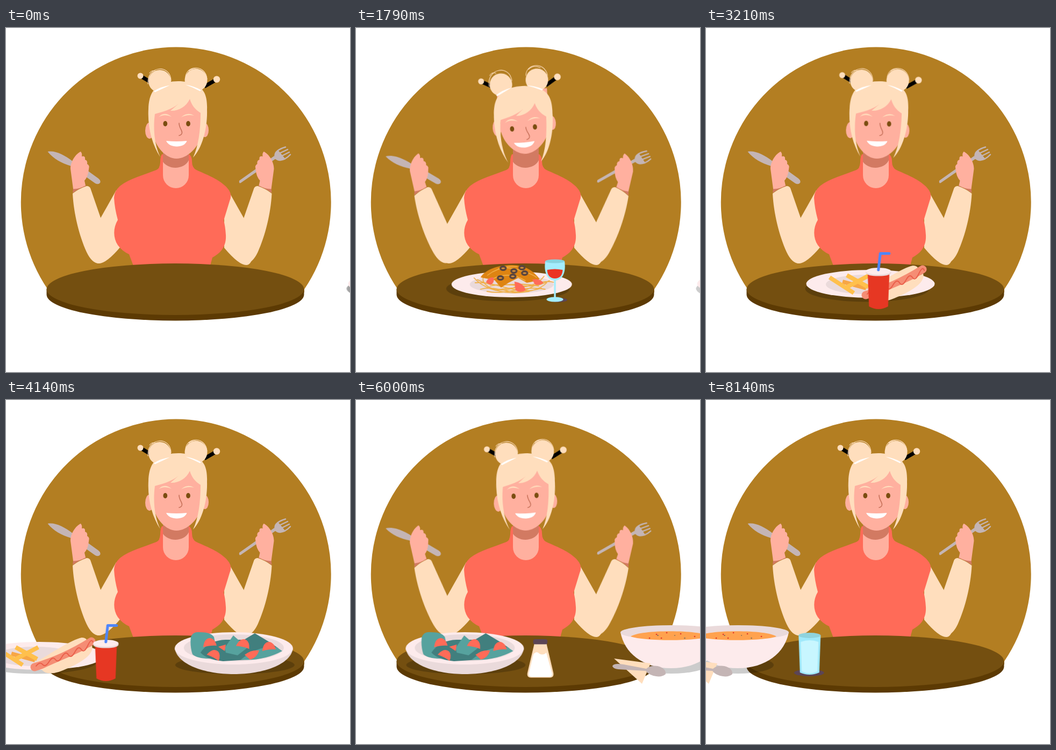
Write an HTML page without scripts that moves like this. It is 640 px wide and 640 px high and loops after 8210 ms.

```html
<!DOCTYPE html>
<html lang="en">
<head>
<meta charset="utf-8">
<title>Dinner table</title>
<style>
html, body { margin: 0; width: 100%; height: 100%; overflow: hidden; background: #fff; }
svg { display: block; width: 100vw; height: 100vh; }

.tilt, .nod, .arm, .dish, .leave, .side, .go, .first, .last {
  animation: 8210ms cubic-bezier(.333, 0, .667, 1) infinite;
}

/* head: sway, then a nod that shifts each layer by its own amount */
.tilt { animation-name: tilt; transform-origin: 317px 262px; }
.nod { animation-name: nod; }
.skull { transform-origin: 318px 190px; --nod: translate(-5px, -9px) rotate(-5deg); }
.eyes { transform-origin: 317px 178px; --nod: translate(-6px, 8px) rotate(-5deg); }
.mouth { transform-origin: 317px 214px; --nod: translate(-4px, 2px) rotate(-5deg); }
.hair { transform-origin: 318px 160px; --nod: translate(-8px, 9px) rotate(-3deg); }
.buns { transform-origin: 320px 95px; --nod: translate(-17px, 3px) rotate(-6deg); }
.wisps { --nod: translate(0px, -4px) rotate(0deg); }
@keyframes tilt {
  0%, 41.41%, 52.25%, 93.67%, 100% { transform: rotate(0deg); }
  7.8%, 14%, 60.05%, 68.8% { transform: rotate(3deg); }
  18.3%, 73.08% { transform: rotate(-2deg); }
  21.3%, 26.8%, 76.7%, 80.5% { transform: rotate(0deg); }
  32.16%, 35.93%, 85%, 88.18% { transform: rotate(3deg); }
}
@keyframes nod {
  0%, 18%, 32.16%, 72.7%, 85%, 100% { transform: translate(0px, 0px) rotate(0deg); }
  21.3%, 26.8%, 76.7%, 80.5% { transform: var(--nod); }
}

.arm.l { animation-name: arm-l; transform-origin: 178px 420px; }
.arm.r { animation-name: arm-r; transform-origin: 441px 420px; }
@keyframes arm-l {
  0%, 35.69%, 52.25%, 87.94%, 100% { transform: translate(0px, 0px) rotate(0deg); }
  13.15%, 28.62%, 65.4%, 80.87% { transform: translate(-5.5px, -1px) rotate(-5.2deg); }
}
@keyframes arm-r {
  0%, 38.37%, 52.25%, 90.62%, 100% { transform: translate(0px, 0px) rotate(0deg); }
  15.6%, 28.62%, 67.85%, 80.87% { transform: translate(2px, -1px) rotate(5.5deg); }
}

/* food: .dish and .side slide in, .leave and .go slide out */
.dish { animation-name: dish; animation-delay: var(--in); }
.side { animation-name: side; animation-delay: var(--in); }
.leave { animation-name: leave; animation-delay: var(--out); animation-timing-function: linear; }
.go { animation-name: go; animation-delay: var(--out); }
.m1 { --in: 0ms; --out: -250ms; }
.m2 { --in: -6460ms; --out: -6460ms; }
.m3 { --in: -4460ms; --out: -4460ms; }
.m4 { --in: -2460ms; --out: -2460ms; }
@keyframes dish {
  0%, .24%, 78.67%, 100% { transform: translateX(450px); }
  7.06%, 78.66% { transform: translateX(0px); }
}
@keyframes side {
  0%, 3.53%, 78.67%, 100% { transform: translateX(450px); }
  10.84%, 15.2% { transform: translateX(0px); }
  23.1%, 78.66% { transform: translateX(70px); }
}
@keyframes leave {
  0%, 23.14%, 78.67%, 100% { transform: translateX(0px); }
  23.87% { transform: translateX(-2px); }
  24.85% { transform: translateX(-15px); }
  26.07% { transform: translateX(-48px); }
  27.41% { transform: translateX(-102px); }
  29.11% { transform: translateX(-243px); }
  31.06% { transform: translateX(-400px); }
  32.64%, 78.66% { transform: translateX(-460px); }
}
@keyframes go {
  0%, 26.45%, 78.67%, 100% { transform: translateX(0px); }
  32.64%, 78.66% { transform: translateX(-470px); }
}
.first { animation-name: first; animation-timing-function: step-end; }
.last { animation-name: last; animation-timing-function: step-end; }
@keyframes first { 0% { visibility: visible; } 40%, 100% { visibility: hidden; } }
@keyframes last { 0% { visibility: hidden; } 40%, 100% { visibility: visible; } }

.skin { fill: #ffb09f; }
.tan { fill: #ffdebd; }
.red { fill: #ff6b58; }
.steel { fill: #c4b5b5; }
.china { fill: #fdebec; }
.rim { fill: #eadadb; }
.leaf { fill: #56a29e; }
.dark { fill: #417f7e; }
.shade { fill: #000; opacity: .2; }
.plum { fill: #5c4555; }
.line { fill: none; stroke-linecap: round; stroke-linejoin: round; }
</style>
</head>
<body>
<svg viewBox="0 0 640 640">
<defs>
  <path id="upper" class="tan" d="M205 302L165 373L160 420Q164 438 173 438Q187 438 214 406L214 340Z"/>
  <g id="fore">
    <path class="tan" d="M124 308C133 301 141 297 150 294Q155 294 157 298L176 353L196 410Q192 434 173 438Q160 438 150 417C136 386 126 345 124 308Z"/>
    <path fill="#d27a62" d="M124 307L125 298L147 291L149 294Q136 298 124 307Z"/>
    <path class="skin" d="M120 262C120 248 130 234 139 230Q142 233 141 239Q148 237 147 245Q152 246 151 253Q156 255 154 263Q153 276 146 284L148 293Q136 300 125 299.500Z"/>
  </g>
  <path id="wedge" class="red" d="M-12 8Q-10-10 2-9Q10-7 13 5Q2 4-12 8Z"/>
  <ellipse id="olive" rx="5" ry="3.300" fill="#d8923a" stroke="#57443f" stroke-width="3.400"/>
</defs>

<path fill="#b37e22" d="M77.500 486A288.500 288.500 0 1 1 555 486V492H77.500Z"/>

<use href="#upper"/>
<use href="#upper" transform="translate(620 3) scale(-1 1)"/>
<g class="arm l">
  <path class="steel" d="M77.500 230C92 227.500 108 236 124 248L154 267L172 280Q177 284 175 288Q172 292 166 289L120 256.500C104 252 88 243 77.500 230Z"/>
  <use href="#fore"/>
</g>
<g class="arm r">
  <path class="steel" d="M434 284L499 238L502 243L437 288Q433 290 434 284Z"/>
  <path class="steel" d="M500 243Q497 231 506 227L520 244Q509 251 500 243Z"/>
  <path class="line" stroke="#c4b5b5" stroke-width="2.400" d="M505 228.500Q511 224 520 221.500M509 233L524 226M513 238L527 231M518 244Q524 241 529 235.500"/>
  <use href="#fore" transform="translate(618.500 0) scale(-1 1)"/>
</g>

<path class="red" d="M290 235Q287 240 287 250Q286 262 280 264C255 274 230 280 212 294Q201 304 201 316Q202 335 208 357C199 372 199 390 208 404Q217 416 229 421L238 445H379L384 427C403 417 410 403 409 385Q408 369 405 358L416 322Q421 311 415 302C403 284 376 274 354 264Q346 260 346 248Q346 239 341 235Z"/>
<path class="skin" d="M292 222H340V274A24 24 0 0 1 292 274Z"/>
<path fill="#d27a62" d="M292 222H340V246C336 255 325 260 315 260C305 260 296 255 292 249Z"/>

<g class="tilt">
  <g class="nod skull skin">
    <ellipse cx="267" cy="191" rx="8" ry="15"/>
    <ellipse cx="370" cy="190" rx="7" ry="13"/>
    <path d="M272 125L274 198C278 222 298 243 317 243C337 243 359 222 364 198L366 125Z"/>
  </g>
  <g class="nod eyes">
    <g fill="#7a4d10"><ellipse cx="296.300" cy="178" rx="3.900" ry="4.900"/><ellipse cx="339" cy="178" rx="3.900" ry="4.900"/></g>
    <path class="tan" d="M284 166Q294 154 308 165Q294 159 284 166ZM326 166Q338 155 350 163Q338 160 326 166Z"/>
    <path class="line" stroke="#c56f58" stroke-width="1.500" d="M322 177C322 186 328 190 327.500 195Q327 199 322 200"/>
  </g>
  <path class="nod mouth" fill="#fff" d="M298 210Q317 212 336.500 210C332 224 304 224 298 210Z"/>
  <path class="nod hair tan" d="M287 240C272 217 263 185 265 150C266 126 273 114 285 108C300 97 335 96 352 106C368 112 375 125 374 152C375 185 366 222 348 241C358 220 362 190 362 158C352 152 345 143 342 132C335 147 320 155 306 154L321 141C308 152 290 156 277 160C273 190 277 220 287 240Z"/>
  <g class="nod buns">
    <path fill="none" stroke="#000" stroke-width="7" d="M253 91L268 100M369 109L388 98"/>
    <g class="tan">
      <circle cx="250" cy="89" r="5.500"/><circle cx="392" cy="95.500" r="6.200"/>
      <circle cx="286" cy="99" r="21"/><circle cx="353.500" cy="97" r="21"/>
    </g>
    <g class="nod wisps line" stroke="#ffdebd" stroke-width="1.100">
      <path d="M264 104C262 70 306 66 307 98M267 84Q272 77 279 81M334 91C336 68 372 68 374 95M340 80Q350 72 362 79"/>
    </g>
    <path fill="#fff" d="M275 117.500Q288 109 305 106.500Q291 113 277 119.500ZM334 105.500Q350 108 363 115.500L361 117.500Q349 111 334 105.500Z"/>
  </g>
</g>

<path fill="#5c3a03" d="M75.500 486V496A239.500 48.500 0 0 0 554.500 496V486Z"/>
<ellipse cx="315" cy="486" rx="239.500" ry="48" fill="#744f10"/>

<!-- pasta and wine -->
<g class="first m1">
  <g class="dish"><g class="leave"><g transform="translate(15)">
    <ellipse class="shade" cx="283" cy="485" rx="115" ry="23.500"/>
    <ellipse class="china" cx="290" cy="477" rx="112" ry="24"/>
    <ellipse class="rim" cx="290" cy="477" rx="78" ry="17"/>
    <g class="line" stroke="#f0b04a" stroke-width="1.800">
      <path d="M220 465C250 500 330 500 355 474M222 474C260 470 300 500 345 484M232 486C262 478 280 496 322 490M238 462C228 480 270 498 300 480M350 462C330 490 285 480 262 488M368 473C335 465 330 492 290 492M226 468C260 488 290 470 340 480M244 490C280 498 310 478 352 486M250 480C290 470 320 492 360 470"/>
    </g>
    <path fill="#de8412" d="M232 464C240 450 264 441 290 441C316 441 331 453 342 467Q332 472 318 474L302 465L284 474L270 483L258 469Z"/>
    <path class="line" stroke="#f0b04a" stroke-width="1.500" d="M245 460Q270 440 300 449T336 464M256 466Q285 452 315 470M265 448Q285 442 300 444"/>
    <use href="#olive" x="274" y="447"/><use href="#olive" x="309" y="446"/>
    <use href="#olive" x="294" y="452"/><use href="#olive" x="314" y="456"/>
    <use href="#olive" x="269" y="465"/><use href="#olive" x="292" y="462"/>
    <path class="red" d="M242 473Q246 463 256 464Q259 474 250 478ZM295 472Q312 474 316 488Q306 494 297 488ZM328 468Q342 465 349 474Q342 480 333 477Z"/>
  </g></g></g>
  <g class="side"><g class="go"><g transform="translate(-64)">
    <ellipse class="plum" cx="376" cy="506" rx="16" ry="4"/>
    <g fill="#a4edfd">
      <ellipse cx="369" cy="505" rx="15.500" ry="4.500"/>
      <path d="M367.300 468H370.700V504H367.300Z"/>
      <path d="M351 434C348 455 355 469 369 470C383 469 390 455 387 434Z"/>
    </g>
    <ellipse cx="369" cy="434" rx="18" ry="3.600" fill="#88d4df"/>
    <path fill="#ea3323" d="M354.500 450Q369 447 383.500 450C383 461 377 466 369 466C361 466 355 461 354.500 450Z"/>
  </g></g></g>
</g>

<!-- hot dog and drink -->
<g class="m2">
  <g class="dish"><g class="leave">
    <ellipse class="shade" cx="300" cy="485" rx="115.500" ry="24.500"/>
    <ellipse class="china" cx="306" cy="476" rx="119.500" ry="26"/>
    <ellipse class="rim" cx="298" cy="477" rx="75" ry="18"/>
    <g fill="none" stroke="#ffc04c" stroke-width="8">
      <path stroke="#f7a645" d="M254 472L298 484"/>
      <path d="M262 460L302 482M262 482L304 460M230 464L275 493"/>
    </g>
    <path class="tan" d="M296 490C330 470 365 446 385 442Q394 442 396 450L302 500Z"/>
    <path class="line" stroke="#f58d74" stroke-width="15" d="M297 497Q350 482 403 449"/>
    <path class="tan" d="M310 501C340 486 375 474 404 457C408 471 390 488 342 506Q318 513 310 501Z"/>
    <path class="line" stroke="#ea5f4a" stroke-width="2" d="M300 495q7-9 12-3t12-5t12-4t12-5t12-4t12-5t12-5t12-7t10-6"/>
  </g></g>
  <g class="side"><g class="go"><g transform="translate(-17)">
    <path fill="#e63723" d="M300 456H340.500L338 518Q320 528 302.500 518Z"/>
    <path class="rim" d="M296.500 453V456Q300 461.500 320 461.500T343.500 456V453Z"/>
    <ellipse class="china" cx="320" cy="452.500" rx="23.500" ry="6.500"/>
    <path class="line" stroke="#4e86fb" stroke-width="5" d="M320 450L323.500 419.500H340"/>
  </g></g></g>
</g>

<!-- salad and salt -->
<g class="m3">
  <g class="dish"><g class="leave">
    <ellipse class="shade" cx="307" cy="493" rx="111" ry="17"/>
    <path class="rim" d="M195 462C200 492 250 510 305 510S411 492 415 462Z"/>
    <ellipse class="china" cx="305" cy="462" rx="110" ry="30"/>
    <ellipse class="rim" cx="305" cy="461" rx="93" ry="25"/>
    <path class="leaf" d="M225 441Q229 430 243 432Q262 432 268 441L276 480Q240 484 228 473Q223 458 225 441Z"/>
    <path class="dark" d="M243 470Q258 447 290 446L324 446L344 434L374 452L388 462L345 482L285 486Q255 483 243 470Z"/>
    <path class="leaf" d="M288 461L304 438L330 461L312 475L290 470ZM318 483Q350 456 385 460L395 467Q360 486 318 483Z"/>
    <use href="#wedge" x="260" y="452"/>
    <use href="#wedge" transform="translate(269 474) rotate(35)"/>
    <path class="red" d="M276 459L290 455L288 467Z"/>
    <use href="#wedge" transform="translate(323 454) rotate(20)"/>
    <path class="red" d="M325 474Q338 464 352 466Q348 480 335 483Z"/>
    <use href="#wedge" x="370" y="459"/>
  </g></g>
  <g class="side"><g class="go">
    <path class="tan" d="M293 452H315L328 507Q330 516 322 516.500H286Q278 516 280 507Z"/>
    <path fill="#fff" d="M291 473Q297 466 302 472Q309 476 315 470L325.500 508Q327 515 320 515H288Q281 515 282.500 508Z"/>
    <rect class="plum" x="290.500" y="445" width="26.500" height="9.500" rx="3.500"/>
  </g></g>
</g>

<!-- soup and water -->
<g class="last m4">
  <g class="dish"><g class="leave">
    <ellipse class="shade" cx="303" cy="493" rx="67" ry="16"/>
    <path class="china" d="M209 432C216 470 250 499 303 499S391 470 398 432Z"/>
    <ellipse class="rim" cx="303.500" cy="432.500" rx="94.500" ry="13.500"/>
    <path fill="#ffa24f" d="M228 440C245 427 358 427 375 440C350 449 253 449 228 440Z"/>
    <path class="line" stroke="#e0382a" stroke-width="2.600" d="M263 443h.1M276 436h.1M295 433h.1M321 435h.1M285 443h.1M347 440h.1"/>
    <path class="line" stroke="#85705a" stroke-width="1.800" d="M278 438h1M328 443h1M310 438h.1"/>
    <path class="tan" d="M197 481L265 490L249 528Z"/>
    <path class="steel" d="M194 495Q196 489 215 492L257 500Q265 493 278 495Q294 499 293 510Q285 517 270 513Q260 510 256 504L205 501Q195 500 194 495Z"/>
  </g></g>
  <g class="side"><g class="go"><g transform="translate(-29)">
    <ellipse class="plum" cx="338" cy="507.500" rx="28" ry="6.500"/>
    <path fill="#a0e9fb" d="M318.500 438L321 507Q339 515 357 507L359.500 438Z"/>
    <path fill="#c8f6ff" d="M322.500 450Q339 444 355.500 450L353.500 505Q339 512 324.500 505Z"/>
    <ellipse cx="339" cy="438" rx="20.500" ry="5" fill="#8fd3de"/>
  </g></g></g>
</g>
</svg>
</body>
</html>
```
